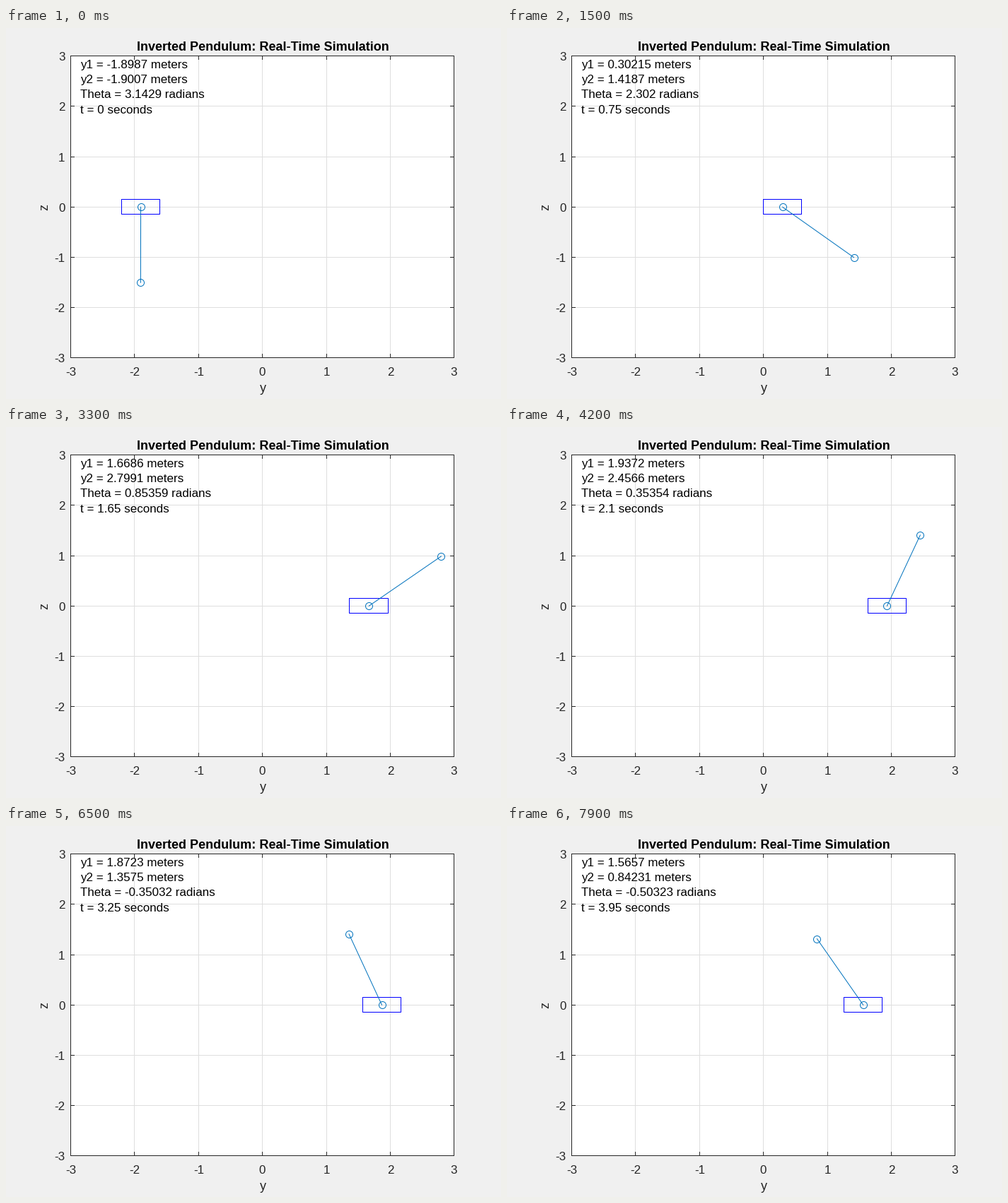
Write a matplotlib script that moves like this. It is 700 px wide and 525 px high and loops after 8000 ms.

```python
import numpy as np
import matplotlib.pyplot as plt
from matplotlib.animation import FuncAnimation

W, H, DPI = 700, 525, 100
FRAMES, INTERVAL = 80, 100
DT = 0.05                # simulated seconds per frame
ROD = 1.5
PX = 72 / DPI            # points per pixel
DARK, BLUE, STEEL, GRID = "#262626", "#0000ff", "#0072bd", "#dedede"

plt.rcParams["font.family"] = "Liberation Sans"


def natural_spline(x, y):
    """Natural cubic spline through the points (x, y)."""
    x, y = np.array(x), np.array(y)
    h = np.diff(x)
    n = len(x)
    a, b = np.eye(n), np.zeros(n)
    for i in range(1, n - 1):
        a[i, i - 1:i + 2] = h[i - 1], 2 * (h[i - 1] + h[i]), h[i]
        b[i] = 6 * ((y[i + 1] - y[i]) / h[i] - (y[i] - y[i - 1]) / h[i - 1])
    m = np.linalg.solve(a, b)

    def value(t):
        i = int(np.clip(np.searchsorted(x, t) - 1, 0, n - 2))
        p, q = x[i + 1] - t, t - x[i]
        return ((m[i] * p**3 + m[i + 1] * q**3) / (6 * h[i])
                + (y[i] / h[i] - m[i] * h[i] / 6) * p
                + (y[i + 1] / h[i] - m[i + 1] * h[i] / 6) * q)
    return value


cart_pos = natural_spline(
    [0, 0.35, 0.45, 0.9, 1.15, 1.65, 2.6, 3.25, 3.95],
    [-1.8987, -0.7809, -0.484, 0.628, 1.0685, 1.6686, 2.0085, 1.8723, 1.5657])
angle = natural_spline(
    [0, 0.35, 0.45, 0.9, 1.15, 1.65, 1.8, 2.25, 2.6, 3.25, 3.95],
    [3.1429, 3.0477, 2.877, 2.02, 1.5835, 0.85359, 0.667, 0.222,
     -0.03657, -0.35032, -0.50323])


def sx(y):
    return 91 + (y + 3) * 542.5 / 6


def sy(z):
    return 253.3 - z * 71.3


fig = plt.figure(figsize=(W / DPI, H / DPI), dpi=DPI, facecolor="#f0f0f0")
ax = fig.add_axes([0, 0, 1, 1])
ax.set_xlim(0, W)
ax.set_ylim(H, 0)
ax.axis("off")


def line(xs, ys, color, **kw):
    return ax.plot(xs, ys, color=color, lw=PX, snap=False, **kw)[0]


def label(x, y, s, size=17, color=DARK, **kw):
    return ax.text(x, y, s, fontsize=size * PX, color=color,
                   va="baseline", **kw)


L, R, T, B = 91.5, 633.5, 39.5, 466.5
ax.fill([L, R, R, L], [T, T, B, B], color="white", lw=0)

values = range(-3, 4)
cols = [round(sx(v)) + 0.5 for v in values]
cols[-1] = R
rows = [int(sy(v)) + 0.5 for v in values]
rows[0] = B
for c, r in zip(cols[1:-1], rows[1:-1]):
    line([c, c], [T, B], GRID)
    line([L, R], [r, r], GRID)
for v, c, r in zip(values, cols, rows):
    for y0, d in ((T, 5), (B, -5)):
        line([c, c], [y0, y0 + d], DARK)
    for x0, d in ((L, 5), (R, -5)):
        line([x0, x0 + d], [r, r], DARK)
    label(c, 492, str(v), ha="center")
    label(83.5, r + 6.5, str(v), ha="right")
line([L, R, R, L, L], [T, T, B, B, T], DARK)

label(363, 32, "Inverted Pendulum: Real-Time Simulation", 18, "black",
      ha="center", weight="bold")
label(363, 515, "y", 18, ha="center")
label(59.5, 253.5, "z", 18, ha="center", rotation=90, rotation_mode="anchor")

cart = line([], [], BLUE, zorder=4)
rod = line([], [], STEEL, zorder=5, marker="o", ms=10 * PX, mfc="none",
           mew=PX)
notes = [label(105, y, "", color="black", zorder=6)
         for y in (57, 78, 99, 121)]


def update(i):
    t = i * DT
    y1, theta = cart_pos(t), angle(t)
    y2, z2 = y1 + ROD * np.sin(theta), ROD * np.cos(theta)

    x0, x1 = (int(sx(y1 + d)) + 0.5 for d in (-0.3, 0.3))
    top, bottom = (int(sy(d)) + 0.5 for d in (0.15, -0.15))
    cart.set_data([x0, x1, x1, x0, x0], [top, top, bottom, bottom, top])
    rod.set_data([sx(y1), sx(y2)], [sy(0), sy(z2)])

    texts = (f"y1 = {y1:.5g} meters", f"y2 = {y2:.5g} meters",
             f"Theta = {theta:.5g} radians", f"t = {t:.5g} seconds")
    for note, s in zip(notes, texts):
        note.set_text(s)
    return [cart, rod, *notes]


anim = FuncAnimation(fig, update, frames=FRAMES, interval=INTERVAL,
                     repeat=True, repeat_delay=0)
plt.show()
```
